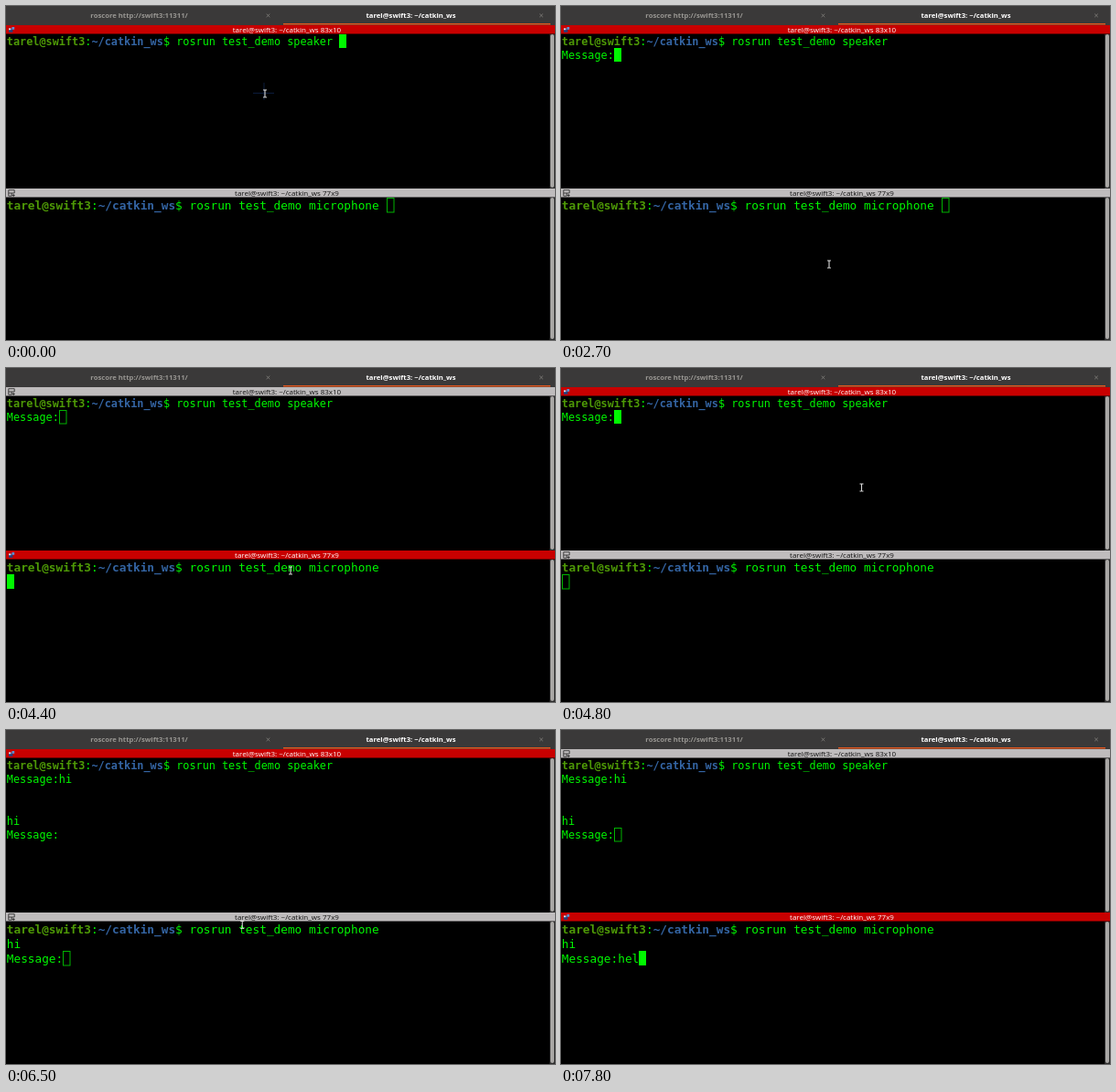
Recreate the animation shown at these times as an HTML page. Size 600x366 px, loop 8 s.

```html
<!DOCTYPE html>
<html lang="en">
<head>
<meta charset="utf-8">
<title>Two terminal panes</title>
<style>
  html, body { margin: 0; width: 100%; height: 100%; overflow: hidden; background: #000; }
  svg { display: block; width: 100vw; height: 100vh; }
  text { white-space: pre; }
  .ui { font-family: "Open Sans", "Noto Sans", sans-serif; font-size: 8px; font-weight: 500; text-anchor: middle; }
  .tab { font-weight: 700; font-size: 7.7px; }
  .term { font-family: "DejaVu Sans Mono", "Noto Sans Mono", monospace; }
</style>
</head>
<body>
<svg id="stage" viewBox="0 0 600 366"></svg>
<script>
const LOOP = 8000, STEP = 100, BLINK = 600;
const GREEN = '#00f800', OUTLINE = '#00b400', OLIVE = '#4e9a06', BLUE = '#3465a4';
const USER = 'tarel@swift3', DIR = '~/catkin_ws';
const stage = document.getElementById('stage');

function add(parent, tag, attrs, text) {
  const node = document.createElementNS('http://www.w3.org/2000/svg', tag);
  for (const key in attrs) node.setAttribute(key, attrs[key]);
  if (text !== undefined) node.textContent = text;
  parent.appendChild(node);
  return node;
}
const rect = (parent, x, y, width, height, fill) =>
  add(parent, 'rect', { x, y, width, height, fill });

const panes = [
  { y: 21, size: '83x10', cell: 7.13, line: 15.2, command: 'rosrun test_demo speaker ', bottom: 200 },
  { y: 200, size: '77x9', cell: 7.68, line: 16.1, command: 'rosrun test_demo microphone ', bottom: 366 }
];

// Each entry: time, focused pane, then the lines below the prompt in each pane
// (null keeps the caret on the prompt line).
const script = [
  [0, 0, null, null],
  [1000, 0, [''], null],
  [1400, 0, ['Message:'], null],
  [3400, 1, ['Message:'], null],
  [4000, 1, ['Message:'], ['']],
  [4700, 0, ['Message:'], ['']],
  [5100, 0, ['Message:h'], ['']],
  [5200, 0, ['Message:hi'], ['']],
  [5400, 0, ['Message:hi', ''], ['']],
  [5600, 0, ['Message:hi', '', '', 'hi', 'Message:'], ['hi', 'Message:']]
];
const spoken = script[script.length - 1][2];
[[6900, ''], [7400, 'h'], [7600, 'he'], [7700, 'hel']].forEach(([time, typed]) =>
  script.push([time, 1, spoken, ['hi', 'Message:' + typed]]));

// Pointer trips: visible from the first point until `end`.
const trips = [
  { end: 1000, points: [[0, 283, 96]] },
  { end: 4000, points: [[1900, 285, 110], [2000, 303, 190], [2100, 302, 262], [2200, 293, 283]] },
  { end: 5100, points: [[4400, 311, 222], [4700, 328.5, 131]] },
  { end: 7400, points: [[6200, 328.5, 131], [6800, 188, 296]] }
];

function drawTabs() {
  rect(stage, 0, 0, 600, 21, '#3a3939');
  rect(stage, 303, 19, 292, 1.5, '#e2571f');
  const label = (x, fill, text) => add(stage, 'text', { x, y: 13, fill, class: 'ui tab' }, text);
  label(145.5, '#989692', 'roscore http://swift3:11311/');
  label(442.5, '#ffffff', USER + ': ' + DIR);
  for (const x of [286.5, 585])
    add(stage, 'path', { d: `M${x - 1.8} 8.6l3.6 3.6m0-3.6l-3.6 3.6`, stroke: '#85827e', 'stroke-width': 0.8 });
}

function buildPane(pane) {
  pane.top = pane.y + 10;
  rect(stage, 594, pane.top, 6, pane.bottom - pane.top, '#2c2c2c');
  add(stage, 'rect', { x: 595, y: pane.top, width: 4, height: pane.bottom - pane.top - 1, rx: 2, fill: '#a9a7a5' });
  pane.bar = rect(stage, 0, pane.y, 600, 9.5, '#c80000');
  pane.title = add(stage, 'text', { x: 307, y: pane.y + 7.6, class: 'ui' }, `${USER}: ${DIR} ${pane.size}`);

  pane.iconOff = add(stage, 'g', { fill: 'none', stroke: '#222', 'stroke-width': 0.8 });
  add(pane.iconOff, 'path', { d: `M2.8 ${pane.y + 1.7}h6.4v3.3h-6.4zM2.8 ${pane.y + 5}v3.2h3.4v-3.2M8.2 ${pane.y + 6}v3M6.7 ${pane.y + 7.5}h3` });
  pane.iconOn = add(stage, 'g', {});
  rect(pane.iconOn, 3, pane.y + 3.8, 4.4, 4, '#24407c');
  rect(pane.iconOn, 6.4, pane.y + 2, 2.8, 2.8, '#5f8fd0');
  rect(pane.iconOn, 3, pane.y + 3.4, 2.4, 1.8, '#d8dde8');

  pane.screen = add(stage, 'g', { class: 'term', 'font-size': pane.cell / 0.602, fill: GREEN });
  let column = 0;
  for (const [text, fill, weight] of [[USER, OLIVE, 700], [':', GREEN, 400], [DIR, BLUE, 700], ['$ ' + pane.command, GREEN, 400]]) {
    put(pane, pane.screen, column, 0, text, { fill, 'font-weight': weight });
    column += text.length;
  }
  pane.promptEnd = column;
  pane.output = add(pane.screen, 'g', {});
  pane.caret = add(pane.screen, 'rect', {});
}

const left = (pane, column) => 0.8 + column * pane.cell;

function put(pane, parent, column, row, text, attrs) {
  const y = pane.top + (row + 0.79) * pane.line;
  add(parent, 'text', { x: left(pane, column), y, ...attrs }, text);
}

function updatePane(pane, focused, lines, lit) {
  pane.bar.setAttribute('fill', focused ? '#c80000' : '#bfbcbd');
  pane.title.setAttribute('fill', focused ? '#ffffff' : '#111111');
  pane.iconOn.style.display = focused ? '' : 'none';
  pane.iconOff.style.display = focused ? 'none' : '';

  if (pane.lines !== lines) {
    pane.lines = lines;
    pane.output.replaceChildren();
    (lines || []).forEach((text, i) => put(pane, pane.output, 0, i + 1, text));
  }
  const row = lines ? lines.length : 0;
  const column = lines ? lines[row - 1].length : pane.promptEnd;
  const inset = focused ? 0 : 0.5;
  const box = {
    x: Math.round(left(pane, column)) + inset,
    y: Math.round(pane.top + row * pane.line) + inset,
    width: Math.ceil(pane.cell) - inset,
    height: Math.round(pane.line) - inset,
    fill: focused ? GREEN : 'none',
    stroke: focused ? 'none' : OUTLINE,
    visibility: focused && !lit ? 'hidden' : 'visible'
  };
  for (const key in box) pane.caret.setAttribute(key, box[key]);
}

function pointerAt(time) {
  const trip = trips.find(({ points, end }) => time >= points[0][0] && time < end);
  if (!trip) return null;
  const { points } = trip;
  const next = points.findIndex(point => point[0] > time);
  if (next < 0) return points[points.length - 1].slice(1);
  const [t0, x0, y0] = points[next - 1], [t1, x1, y1] = points[next];
  const k = (time - t0) / (t1 - t0), ease = k * k * (3 - 2 * k);
  return [x0 + (x1 - x0) * ease, y0 + (y1 - y0) * ease];
}

rect(stage, 0, 0, 600, 366, '#000');
drawTabs();
panes.forEach(buildPane);
const glow = add(stage, 'path', { d: 'M270 95.5h23M282 84v19', stroke: '#0b1c3d' });
const pointer = add(stage, 'path', {
  d: 'M-2-4H-.6L0-3.5 .6-4H2M0-3.5V3.5M-2 4H-.6L0 3.5 .6 4H2',
  fill: 'none', stroke: '#d8d8d8', 'stroke-width': 1.1
});

function render(now) {
  const time = Math.floor((now % LOOP) / STEP) * STEP;
  const [since, focus, ...contents] = script.findLast(entry => entry[0] <= time);
  const lit = Math.floor((time - since) / BLINK) % 2 === 0;
  panes.forEach((pane, i) => updatePane(pane, i === focus, contents[i], lit));

  const spot = pointerAt(time);
  pointer.style.display = spot ? '' : 'none';
  if (spot) pointer.setAttribute('transform', `translate(${spot})`);
  glow.style.display = time < STEP ? '' : 'none';
}

const start = performance.now();
function tick() {
  render(performance.now() - start);
  requestAnimationFrame(tick);
}
tick();
</script>
</body>
</html>
```
